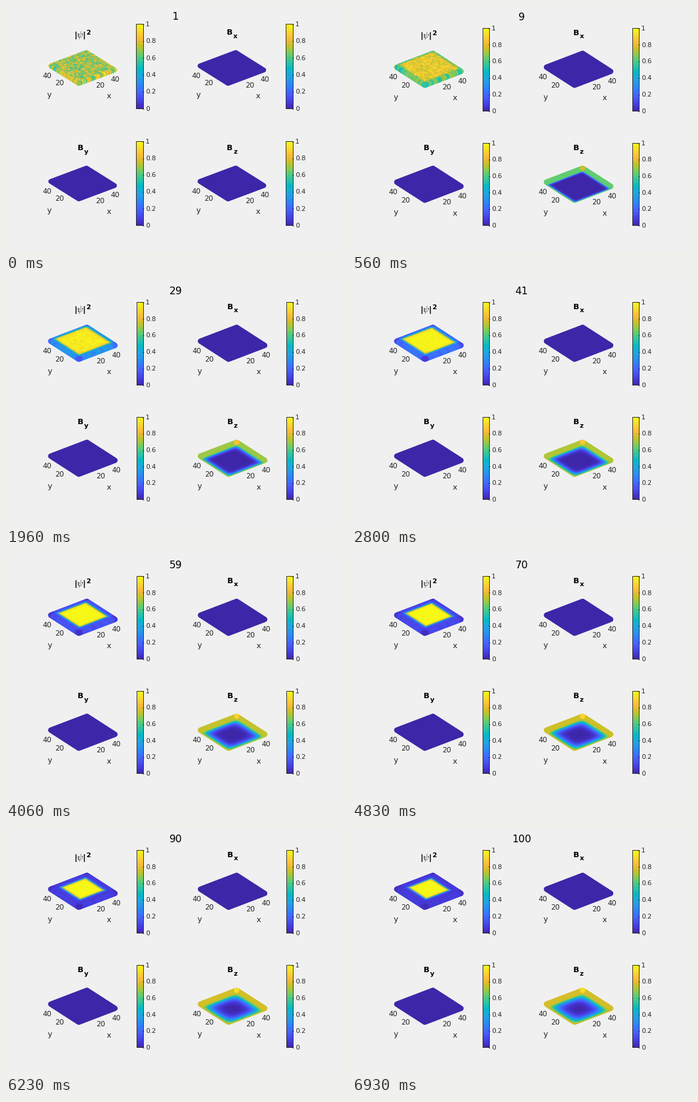
A matplotlib script that plays this animation: 570 px wide and 413 px high, repeating every 7 s.

```python
import matplotlib.pyplot as plt
import numpy as np
from matplotlib.animation import FuncAnimation
from matplotlib.colors import LinearSegmentedColormap
from matplotlib.patches import Polygon, Rectangle

W, H, DPI = 570, 413, 72  # at 72 dpi one point is one pixel
FRAMES, INTERVAL = 100, 70
N = 48                    # grid points per side
INK = "#262626"

PARULA = LinearSegmentedColormap.from_list("parula", [
    (.242, .150, .660), (.265, .198, .795), (.278, .256, .899),
    (.281, .323, .958), (.270, .389, .991), (.221, .460, .997),
    (.179, .529, .968), (.154, .590, .922), (.125, .646, .888),
    (.069, .695, .839), (.007, .731, .766), (.141, .758, .684),
    (.216, .784, .592), (.341, .801, .479), (.504, .799, .348),
    (.672, .779, .223), (.820, .750, .154), (.939, .729, .210),
    (.997, .766, .220), (.979, .839, .177), (.960, .914, .142),
    (.977, .984, .081)])

# Positions belong to the top left panel; "step" leads to the other panels.
FIRST = dict(
    step=(250.2, 194), radius=4,
    bottom=(122, 130), right=(182, 107.5), left=(75, 100.5),
    ticks=[("40", 69, 121.3), ("20", 89.7, 133), ("20", 158, 136.8), ("40", 183.3, 127.3)],
    names=[("y", 72.4, 153), ("x", 172.4, 155)],
    title=(124.3, 48.3), counter=(283.5, 23),
    bar=(218, 13), bar_rows=[(30, 173), (227, 369)])
REST = dict(
    step=(251, 193), radius=4.5,
    bottom=(122, 133), right=(182.7, 109.8), left=(75, 102.7),
    ticks=[("40", 69, 123.4), ("20", 89.3, 136.6), ("20", 158.5, 140.4), ("40", 185.2, 130.3)],
    names=[("y", 73.5, 157), ("x", 172.5, 158.5)],
    title=(124.3, 49.3), counter=(284.5, 24),
    bar=(219, 12), bar_rows=[(37, 177), (230, 369)])

rng = np.random.default_rng(7)
rough = 1 - 2.6 * rng.random((N, N))**1.6  # mostly high, with low specks
smooth = sum(np.roll(rough, (a, b), (0, 1)) for a in (-1, 0, 1) for b in (-1, 0, 1)) / 3

I, J = np.meshgrid(np.arange(N), np.arange(N))
DX, DY = np.minimum(I, N - 1 - I), np.minimum(J, N - 1 - J)
DEPTH = np.minimum(DX, DY)


def density(n):
    """Order parameter: noise settles while the edge is suppressed inwards."""
    core = 1 - .32 * np.exp(-n / 14)
    edge = .06 + .72 * np.exp(-n / 27)
    dark = .65 * (1 - np.exp(-(n / 25)**2))
    corner = np.exp(-(DX**2 + DY**2) / 9)
    seam = .5 * np.exp(-(DX - DY)**2 / 2)
    ring = edge * (1 - dark * np.maximum(corner, seam))
    front = .6 + .081 * n
    grow = 1 / (1 + np.exp(-(DEPTH - front) / .75))
    noise = .15 * np.exp(-n / 18) * rough + .03 * np.exp(-n / 32) * smooth
    noise = noise + .008 * rough * (DEPTH < front)
    return np.clip(ring + (core - ring) * grow + noise, 0, .99)


def field(n):
    """Magnetic field diffusing in from the boundary."""
    level = (.78 - .19 * np.exp(-n / 35)) * (1 - np.exp(-(n - 1) / 1.5))
    reach = .37 * n**.62
    fx, fy = (np.exp(-(d / reach)**1.3) for d in (DX, DY))
    v = level * (1 - (1 - fx) * (1 - fy))
    v[-1, -1] *= 1.2
    return v


def write(ax, x, y, s, size, color=INK, ha="center", **kw):
    return ax.text(x, y, s, fontsize=size, color=color, ha=ha, va="baseline", **kw)


def draw_bar(ax, x, width, top, bottom):
    ax.imshow(np.linspace(1, 0, 256)[:, None], cmap=PARULA, vmin=0, vmax=1, aspect="auto",
              extent=(x, x + width, bottom, top), interpolation="nearest")
    x0, x1, y0, y1 = x + .5, x + width - .5, bottom - .5, top + .5
    ax.add_patch(Rectangle((x0, y1), x1 - x0, y0 - y1, fill=False, ec=INK, lw=1, snap=False))
    for k in range(6):
        y = y0 + (y1 - y0) * k / 5
        ax.plot([x1 - 1.6, x1], [y, y], color=INK, lw=.7)
        write(ax, x1 + 3.6, y + 3.3, f"{k / 5:g}", 11, ha="left")


def draw_psi_title(ax, x, y):
    for dx in (-8, 6):
        write(ax, x + dx, y + 5, "|", 13, "black", weight="bold")
    write(ax, x - .8, y + 4.6, r"$\psi$", 15, "black", math_fontfamily="cm")
    write(ax, x + 13.6, y - .2, "2", 11, "black", weight="bold")


def build(fig, lay):
    ax = fig.add_axes([0, 0, 1, 1])
    ax.axis("off")
    bottom, right, left = (np.array(lay[k]) for k in ("bottom", "right", "left"))
    u, v = right - bottom, left - bottom
    width = 2 * lay["radius"]
    grid = bottom + (I.reshape(-1, 1) * u + J.reshape(-1, 1) * v) / (N - 1)
    far_first = np.argsort(grid[:, 1], kind="stable")
    live = []

    for k, sub in enumerate(("", "x", "y", "z")):
        row, col = divmod(k, 2)
        shift = np.array(lay["step"]) * (col, row)
        if sub in ("", "z"):
            order = far_first if sub == "" else far_first[::-1]
            dots = ax.scatter(*(grid[order] + shift).T, s=width**2, linewidths=0)
            live.append((dots, order, density if sub == "" else field))
        else:
            outline = np.array([bottom, right, right + v, left]) + shift
            ax.add_patch(Polygon(outline, fc=PARULA(0), ec=PARULA(0), lw=width,
                                 joinstyle="round"))
        for items, size in ((lay["ticks"], 12), (lay["names"], 13)):
            for s, x, y in items:
                write(ax, x + shift[0], y + shift[1], s, size)
        tx, ty = lay["title"] + shift
        if sub:
            write(ax, tx, ty, "B", 13, "black", weight="bold")
            write(ax, tx + 9.7, ty + 5.2, sub, 11, "black", weight="bold")
        else:
            draw_psi_title(ax, tx, ty)
        bar_x, bar_width = lay["bar"]
        draw_bar(ax, bar_x + 251 * col, bar_width, *lay["bar_rows"][row])

    counter = write(ax, *lay["counter"], "", 17, "black")
    ax.set(xlim=(0, W), ylim=(H, 0), aspect="auto")
    return ax, live, counter


fig = plt.figure(figsize=(W / DPI, H / DPI), dpi=DPI, facecolor="#f0f0f0")
views = [build(fig, FIRST), build(fig, REST)]


def update(k):
    shown = min(k, 1)
    for i, (ax, _, _) in enumerate(views):
        ax.set_visible(i == shown)
    _, live, counter = views[shown]
    counter.set_text(str(k + 1))
    for dots, order, values in live:
        dots.set_facecolor(PARULA(values(k + 1).ravel()[order]))


anim = FuncAnimation(fig, update, frames=FRAMES, interval=INTERVAL, repeat=True)
plt.show()
```
